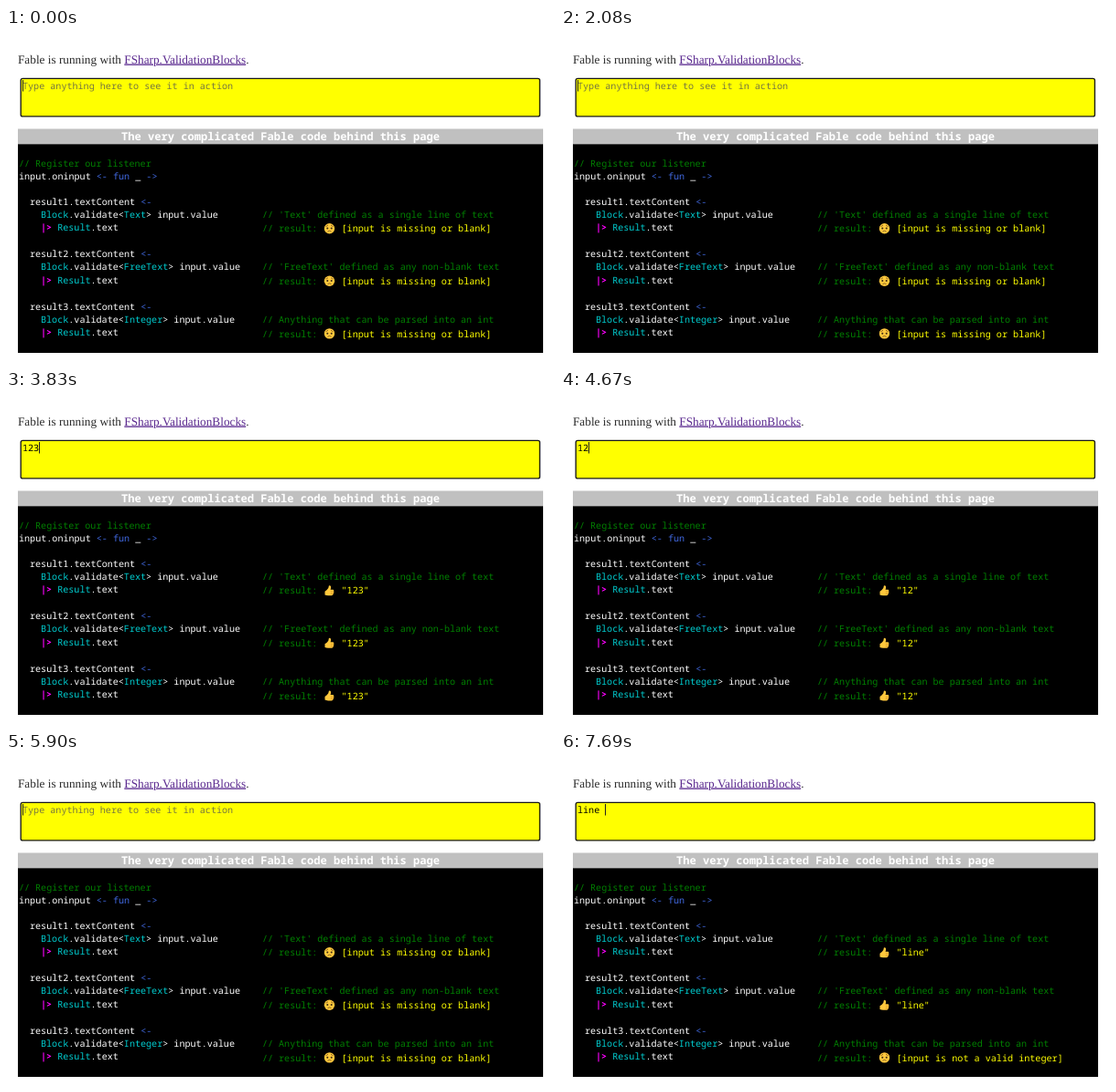
These frames come from a looping animation (600x366 px, 8000 ms). An HTML page:

```html
<!DOCTYPE html>
<html lang="en">
<head>
<meta charset="utf-8">
<title>Validation demo</title>
<style>
  html, body { margin: 0; width: 100%; height: 100%; overflow: hidden; background: #fff; }
  svg { display: block; width: 600px; height: 366px; }
  text { white-space: pre; text-rendering: geometricPrecision; font: 10.1px "Noto Sans Mono", "DejaVu Sans Mono", monospace; }
  .intro { font: 13.26px "Liberation Serif", "Times New Roman", serif; fill: #2a2a2a; }
  .link { fill: #5b2a8f; text-decoration: underline; }
  .title { font-size: 12.08px; font-weight: 700; fill: #fff; text-anchor: middle; }
  .white { fill: #fff; font-weight: 500; }
  .green { fill: #008000; font-size: 10.06px; }
  .blue { fill: #4169e1; }
  .cyan { fill: #00ced1; font-weight: 500; }
  .pink { fill: #f0f; font-weight: 600; }
  .yellow { fill: #ff0; font-size: 10.14px; font-weight: 500; }
  .hint { fill: #757540; }
</style>
</head>
<body>
<svg viewBox="0 0 600 366">
  <defs>
    <g id="sad">
      <circle r="5.7" fill="#ffc83d"/>
      <path d="M-4-2.2Q-2.6-2.7-1.5-3.7M4-2.2Q2.6-2.7 1.5-3.7M-2 3.4Q0 1.6 2 3.4" fill="none" stroke="#6b4d1c" stroke-width=".8"/>
      <circle cx="-2.2" cy="-.2" r="1" fill="#3b2b14"/>
      <circle cx="2.2" cy="-.2" r="1" fill="#3b2b14"/>
    </g>
    <g id="thumb">
      <path d="M-5 1Q-2.5-.5-1.2-2.6L-.6-5.2Q.8-6 1.5-4.4Q1.8-2.8 1.1-1H4Q5.3-.5 4.7.8Q5.3 1.8 4.5 2.6Q4.8 3.6 3.9 4.1Q3.8 5.5 2.4 5.5H-1.5Q-3.6 5.4-5 4.7Z" fill="#ffc83d"/>
      <path d="M1.2.9H4.5M1.2 2.6H4.4M1.2 4.1H3.8" stroke="#d08b22" stroke-width=".5"/>
    </g>
  </defs>
  <text class="intro" x="13" y="38.5">Fable is running with <tspan class="link">FSharp.ValidationBlocks</tspan>.</text>
  <rect x="16.2" y="55.4" width="567.2" height="41.5" rx="2" fill="#ff0" stroke="#181810" stroke-width="1.35"/>
  <text id="input" x="18" y="66.8"></text>
  <rect id="caret" y="57" width="1" height="12.5" fill="#222"/>
  <rect x="13" y="110.5" width="574" height="17" fill="#c0c0c0"/>
  <text class="title" x="300" y="123.3">The very complicated Fable code behind this page</text>
  <rect x="13" y="127.3" width="574" height="228.7"/>
  <g id="code"></g>
</svg>
<script>
const NS = 'http://www.w3.org/2000/svg';
const CHAR = 6.06, LOOP = 8000;
const $ = id => document.getElementById(id);
const code = $('code'), input = $('input'), caret = $('caret');

function add(parent, tag, attrs, content = '') {
  const el = parent.appendChild(document.createElementNS(NS, tag));
  for (const k in attrs) el.setAttribute(k, attrs[k]);
  el.textContent = content;
  return el;
}

// parts: class, text, class, text ...
function line(x, y, ...parts) {
  const t = add(code, 'text', { x, y });
  for (let i = 0; i < parts.length; i += 2) add(t, 'tspan', { class: parts[i] }, parts[i + 1]);
}

line(14, 151.6, 'green', '// Register our listener');
line(14, 165.8, 'white', 'input.oninput ', 'blue', '<- fun ', 'white', '_ ', 'blue', '->');

const isBlank = s => !s.trim();
const check = s => isBlank(s) ? 'input is missing or blank' : '';
const checkInt = s => check(s) || (/^\d+$/.test(s.trim()) ? '' : 'input is not a valid integer');

const blocks = [
  ['Text', "'Text' defined as a single line of text", check],
  ['FreeText', "'FreeText' defined as any non-blank text", check],
  ['Integer', 'Anything that can be parsed into an int', checkInt]
].map(([type, note, validate], i) => {
  const y = 193.5 + i * 57.6;
  line(26, y, 'white', `result${i + 1}.textContent `, 'blue', '<-');
  line(38, y + 14.1, 'cyan', 'Block', 'white', '.validate<', 'cyan', type, 'white', '> input.value');
  line(38, y + 28.6, 'pink', '|> ', 'cyan', 'Result', 'white', '.text');
  line(280, y + 14.1, 'green', '// ' + note);
  line(280, y + 29.9, 'green', '// result:');
  return {
    validate,
    icon: add(code, 'use', { x: 353.5, y: y + 26.2 }),
    out: add(code, 'text', { class: 'yellow', x: 366.5, y: y + 29.9 })
  };
});

// start time, typed text, caret shown
const steps = [
  [0, '', 1], [360, '', 0], [710, '', 1], [1020, '', 0], [1420, '', 1], [1720, '', 0], [2080, '', 1],
  [2430, '1', 1], [2740, '1', 0], [2820, '12', 1], [3130, '123', 1],
  [3480, '123', 0], [3830, '123', 1], [4140, '123', 0], [4540, '123', 1],
  [4670, '12', 1], [4890, '12', 0], [4980, '1', 1], [5200, '1', 0],
  [5330, '', 1], [5590, '', 0], [5900, '', 1], [6250, '', 0],
  [6290, 'l', 1], [6640, 'li', 1], [6950, 'lin', 1], [7250, 'line', 1],
  [7610, 'line', 0], [7690, 'line ', 1]
];

function show([, text, caretOn]) {
  input.textContent = text || 'Type anything here to see it in action';
  input.setAttribute('class', text ? '' : 'hint');
  caret.setAttribute('x', Math.round(18 + text.length * CHAR));
  caret.setAttribute('opacity', caretOn);
  for (const { validate, icon, out } of blocks) {
    const error = validate(text);
    icon.setAttribute('href', error ? '#sad' : '#thumb');
    out.textContent = error ? `[${error}]` : `"${text.trim()}"`;
  }
}

let current;
const start = performance.now();
function tick() {
  const t = (performance.now() - start) % LOOP;
  const step = steps.findLast(s => s[0] <= t);
  if (step !== current) show(current = step);
  requestAnimationFrame(tick);
}
tick();
</script>
</body>
</html>
```
